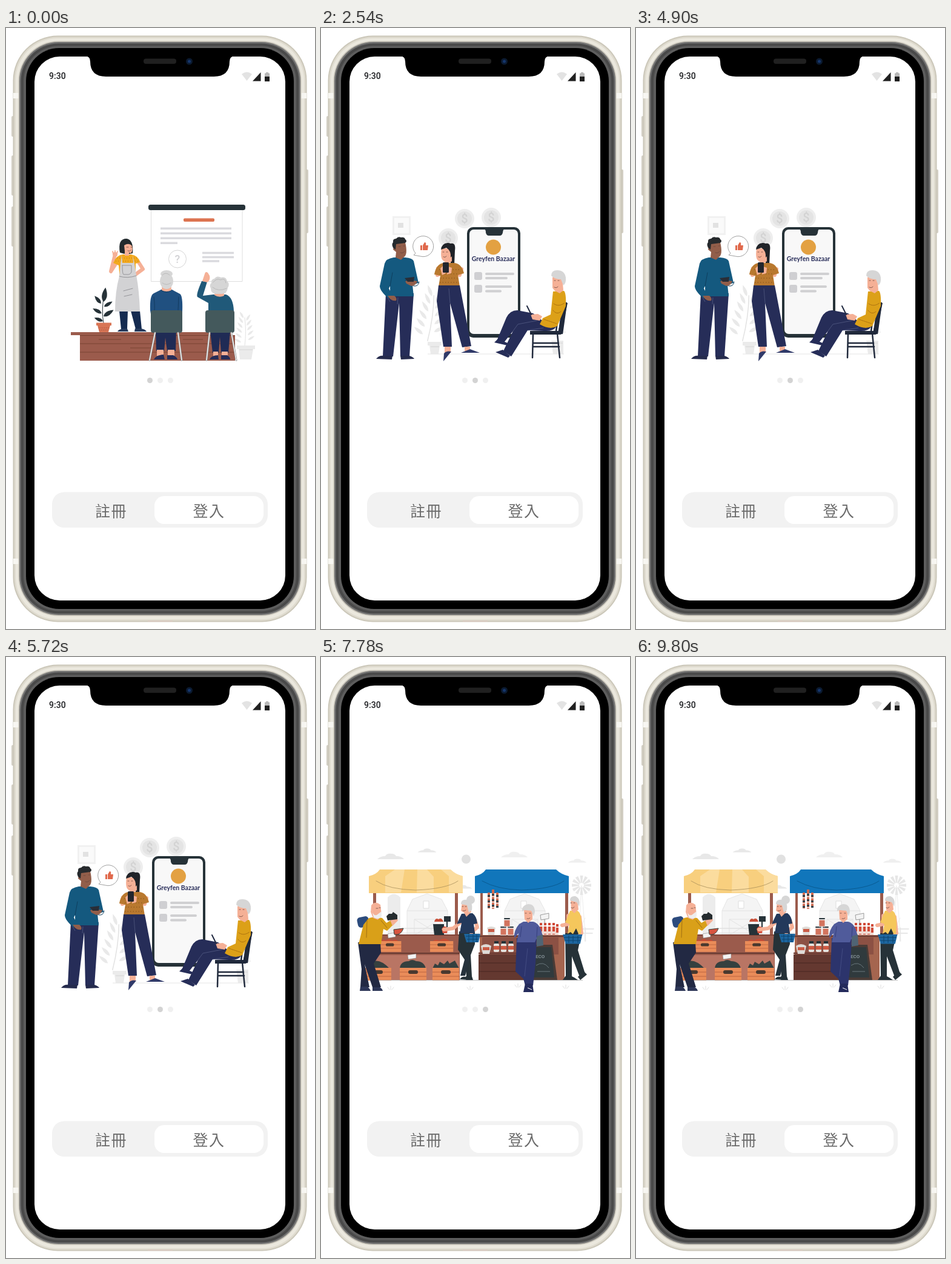
Animation, 510 px wide and 990 px high, one loop 9820 ms. Source, as an HTML page:

```html
<!DOCTYPE html>
<html lang="zh-Hant">
<head>
<meta charset="utf-8">
<title>Onboarding</title>
<style>
html, body { margin: 0; width: 100%; height: 100%; overflow: hidden; background: #fff; }
svg { display: block; width: 510px; height: 990px; }
.slide { opacity: 0; animation: 9820ms linear infinite; }
#chat { animation-name: second; }
#market { animation-name: third; }
@keyframes second {
  0%, 21.38% { opacity: 0; animation-timing-function: ease-out; }
  24.44%, 100% { opacity: 1; }
}
@keyframes third {
  0%, 72.3% { opacity: 0; animation-timing-function: ease-out; }
  75.36%, 100% { opacity: 1; }
}
.line { fill: none; stroke-linecap: round; stroke-linejoin: round; }
.skin { fill: #f5b096; } .dark { fill: #263238; } .navy { fill: #262d58; }
.pale { fill: #ebebeb; } .grey { fill: #dcdce0; } .hair { fill: #d6d6d6; }
.wood { fill: #9b5b4c; } .crate { fill: #ea8c59; } .face { stroke: #68443c; stroke-width: .8; }
.arm { stroke: #f5b096; stroke-width: 6; }
.menu { font: 25px "Noto Sans CJK TC", "Noto Sans CJK", sans-serif; letter-spacing: 1.5px; fill: #6b6b6b; }
</style>
</head>
<body>
<svg viewBox="0 0 510 990">
<defs>
  <path id="leaf" d="M0 0Q-5-5 0-14Q5-5 0 0"/>
  <g id="sprig">
    <path class="line" d="M0 50Q3 25 0 3" stroke="#e2e2e2"/>
    <g id="leaves"></g>
  </g>
  <g id="coin"><circle r="16" fill="#eee"/><circle r="12" fill="#e4e4e4"/><text y="7" text-anchor="middle" font-family="Roboto, sans-serif" font-size="20" font-weight="500" fill="#d3d3d3">$</text></g>
  <path id="cloud" d="M-22 4Q-17-1-9-1Q-6-6 1-5Q7-5 9-1Q18-1 22 4Z" fill="#e8e8e8"/>
  <path id="awning" d="M18 0H134Q142 8 155 11V39H0V11Q13 8 18 0Z"/>
  <g id="box"><path class="crate" d="M0 0H44V21H0Z"/><path d="M0 7H44M0 14H44" stroke="#b65f3d" stroke-width=".9"/><rect x="14" y="4" width="16" height="6" rx="3" fill="#49392f"/></g>
  <g id="barn"><path d="M0 68V28L9 9L33 0L57 9L67 28V68Z" fill="#f4f4f4" stroke="#e5e5e5"/><path d="M0 28H67M12 68V42H55V68M12 42L55 68M55 42L12 68" fill="none" stroke="#e3e3e3"/><path d="M27 12H36V24H27Z" fill="#fff" stroke="#ddd"/></g>
  <g id="jar"><rect width="9" height="14" y="4" rx="2" fill="#e4e1dc"/><rect x="1" width="7" height="4" fill="#263238"/><rect y="8" width="9" height="6" fill="#cf5a43"/></g>
  <path id="basket" d="M0 0H27L24 14H4Z"/>
  <path id="tuft" class="line" d="M0 0L-3-4M2 0V-6M4 0L7-4" stroke="#d6d6d6" stroke-width=".8"/>
</defs>

<!-- handset -->
<g fill="#d3cfc4">
  <rect x="9" y="145" width="5" height="34" rx="2"/><rect x="9" y="210" width="5" height="66" rx="2"/>
  <rect x="9" y="294" width="5" height="66" rx="2"/><rect x="494" y="233" width="5" height="105" rx="2"/>
</g>
<rect x="11.500" y="12.500" width="485" height="966" rx="74" fill="#cbc7b9"/>
<rect x="13.500" y="14.500" width="481" height="962" rx="72" fill="#dfdbcf"/>
<rect x="16" y="17" width="476" height="957" rx="69.500" fill="#ebe8de"/>
<path d="M12 107H22V116H12ZM486 107H496V116H486ZM12 874H22V883H12ZM486 874H496V883H486Z" fill="#f7f6f1"/>
<path d="M234 977H275" stroke="#d8c8bf" stroke-width="2"/>
<rect x="20.500" y="21.500" width="467" height="947" rx="66" fill="#c5c1b6"/>
<rect x="22" y="23" width="464" height="944" rx="64.500" fill="#727272"/>
<rect x="24.500" y="25.500" width="459" height="939" rx="62" fill="#494949"/>
<rect x="29" y="29.500" width="450" height="931" rx="58" fill="#5d5d5d"/>
<rect x="33" y="33" width="442" height="924" rx="54.500" fill="#000"/>
<rect x="47" y="47" width="414" height="896" rx="41.500" fill="#fff"/>
<path d="M131 46Q139 47 139 55Q139 80 165 80H343Q369 80 369 55Q369 47 377 46Z"/>
<rect x="227" y="50.500" width="54" height="8.500" rx="4" fill="#202020"/>
<circle cx="302.500" cy="55" r="5.500" fill="#0b1a30"/><circle cx="302.500" cy="55" r="2.500" fill="#15366c"/>
<text x="71" y="84" font-family="Roboto, sans-serif" font-size="14" font-weight="500" fill="#202124">9:30</text>
<path d="M389 76Q397.500 69 406 76L397.500 87Z" fill="#e3e3e3"/>
<path d="M407 87.500L420.500 73V87.500Z" fill="#202020"/>
<path d="M427 74.500H429V73H433V74.500H435V81H427Z" fill="#b9b9b9"/><path d="M427 80H435V88H427Z" fill="#202020"/>

<rect x="76" y="764.500" width="356" height="58.500" rx="20" fill="#f2f2f2"/>
<rect x="245" y="771" width="180" height="46" rx="16" fill="#fff"/>
<text class="menu" x="147" y="805">註冊</text><text class="menu" x="308.500" y="805">登入</text>

<!-- class -->
<g id="class">
  <g fill="#f0f0f0"><circle cx="254.500" cy="580.500" r="4.500"/><circle cx="271.500" cy="580.500" r="4.500"/></g><circle cx="237.500" cy="580.500" r="4.500" fill="#d3d3d3"/>
  <path d="M239.500 300V417.500H390V300" fill="#fff" stroke="#dedede"/>
  <rect class="dark" x="235" y="291" width="160" height="9" rx="3.500"/>
  <rect x="293" y="313.500" width="51" height="5.500" rx="2" fill="#dc7350"/>
  <path d="M255 330.300H372M255 338.300H372M255 346.300H372M255 354.300H283M324 370.500H376M324 377.500H376M324 384H352" stroke="#dadade" stroke-width="3.400"/>
  <circle cx="283" cy="380.500" r="14.500" fill="#fff" stroke="#d5d5d5"/>
  <text x="283" y="387" text-anchor="middle" font-family="Roboto, sans-serif" font-size="18" font-weight="500" fill="#d3d3d6">?</text>
  <use href="#sprig" x="394" y="474"/>
  <path class="pale" d="M381 523H411V529H408L405 546H386L384 529H381Z"/><path d="M385 530H407" stroke="#d5d5d5"/>
  <path class="wood" d="M107 501H372V506H378V548H122V506H107Z"/>
  <path d="M122 506.500H378M122 520H378M122 534H378M153 513H190M205 527H239M292 513H325" stroke="#74412f" stroke-width=".9"/>
  <g class="dark">
    <path class="line" d="M161 486Q157 466 162 438" stroke="#263238"/>
    <use href="#leaf" transform="translate(161 451)rotate(8)scale(1.700)"/>
    <use href="#leaf" transform="translate(157 454)rotate(-40)scale(1.200)"/>
    <use href="#leaf" transform="translate(162 459)rotate(58)scale(1.150)"/>
    <use href="#leaf" transform="translate(158 470)rotate(-62)scale(1.200)"/>
    <use href="#leaf" transform="translate(161 475)rotate(58)scale(1.400)"/>
    <use href="#leaf" transform="translate(160 483)rotate(-68)scale(1.100)"/>
  </g>
  <path d="M149 485.500H174V490H172L169 501H154L151 490H149Z" fill="#d87555"/><path d="M153 494H170M154 497.500H169" stroke="#a54d38" stroke-dasharray="1.500 1.500"/>

  <path d="M187 466H201L200 496H190ZM206 466H221L224 496H214Z" fill="#152b50"/>
  <path d="M184 500Q186 495 200 495L202 500ZM213 495H222Q230 496 232 500H212Z" fill="#24395b"/>
  <path class="line arm" d="M184 384L173 401L179 377M217 383L226 397L211 408"/>
  <circle class="skin" cx="180" cy="373" r="4"/><path class="line" d="M177 372L176 368M180 371V367M183 372L184 368" stroke="#f5b096" stroke-width="1.800"/>
  <path d="M193 373Q182 374 177 387L186 391L188 414H214L214 388L221 386Q219 375 206 373Z" fill="#f2a91e"/>
  <path d="M183 379H219M181 384H220" stroke="#b67312" stroke-dasharray="1 3"/>
  <path d="M191 374L192 387H210L209 374L212 388L215 407Q220 433 221 467H180Q180 434 187 409L189 388Z" fill="#d2d2d4"/>
  <path class="line" d="M187 409Q201 413 215 408M192 391H207V402Q205 407 199 406H194Q192 405 192 391M194 433L209 429M195 442L208 439" stroke="#858589" stroke-width=".8"/>
  <path d="M188 370Q184 347 199 347Q211 349 209 371Q199 374 188 370Z" fill="#222a2d"/>
  <path class="skin" d="M195 358Q203 353 208 359Q210 367 206 371L203 370V375H196V367Z"/><path class="line face" d="M199 361H202M206 361H208M201 367Q204 369 206 366"/>

  <path d="M247 497H281L280 532H266L263 510L261 532H248Z" fill="#1f2b55"/>
  <path class="skin" d="M249 530H260V540H249ZM267 530H278V540H267Z"/>
  <path class="navy" d="M244 546Q247 539 260 538L262 546ZM266 539H276Q282 542 283 546H266Z"/>
  <path d="M238 465Q237 440 244 437L258 430H272L287 438Q292 441 291 467V477H240Z" fill="#205080"/>
  <path class="line" d="M244 443Q246 458 245 466M285 443L284 466M256 432Q265 438 273 432" stroke="#123b60"/>
  <path d="M258 416H272L273 432Q265 436 257 432Z" class="skin"/><ellipse class="hair" cx="265" cy="417" rx="11" ry="13"/><ellipse class="hair" cx="265" cy="405" rx="10" ry="6"/><path class="line" d="M258 407Q264 401 270 407M258 420Q265 425 272 420" stroke="#bababa"/>
  <rect x="239" y="465" width="52" height="37" rx="4" fill="#44595c"/>
  <path class="line" d="M246 502L237 547M284 502L290 547" stroke="#858585" stroke-width="3"/><path class="line" d="M246 502L237 547M284 502L290 547" stroke="#eee" stroke-width="1.700"/>

  <path d="M337 500H370L367 535H355L353 509L351 535H341Z" fill="#1f2b55"/><path class="skin" d="M342 533H350V541H342ZM356 533H366V541H356Z"/>
  <path class="navy" d="M336 546Q339 539 350 539L351 546ZM355 539H365Q370 542 370 546H355Z"/>
  <path d="M332 418L325 441L342 439H363Q375 443 376 466V475H334V453L316 443Q313 440 323 417Z" fill="#205979"/>
  <path class="skin" d="M324 417L328 405Q329 400 333 403L336 408Q338 415 332 419ZM345 431H360V441Q352 445 344 440Z"/>
  <path class="hair" d="M338 429Q335 423 339 420Q338 414 344 413Q348 407 355 411Q363 409 365 417Q370 422 366 428Q365 438 356 438H346Q338 437 338 429Z"/><path class="line" d="M342 419Q348 411 354 415Q362 411 363 420M341 427Q350 435 364 429" stroke="#bababa"/>
  <rect x="329" y="465" width="48" height="37" rx="4" fill="#44595c"/>
  <path class="line" d="M336 502L331 547M372 502L380 547" stroke="#858585" stroke-width="3"/><path class="line" d="M336 502L331 547M372 502L380 547" stroke="#eee" stroke-width="1.700"/>
</g>

<!-- chat -->
<g id="chat" class="slide">
  <rect x="50" y="280" width="408" height="310" fill="#fff"/>
  <g fill="#f0f0f0"><circle cx="237.500" cy="580.500" r="4.500"/><circle cx="271.500" cy="580.500" r="4.500"/></g><circle cx="254.500" cy="580.500" r="4.500" fill="#d3d3d3"/>
  <path d="M118 310H148V341H118Z" fill="#f1f1f1"/><path d="M121 313H145V338H121Z" fill="#fafafa"/><path d="M127 321H136V329H127Z" fill="#e2e2e2"/>
  <use href="#coin" x="237" y="314"/><use href="#coin" x="281" y="312"/><use href="#coin" x="210" y="346"/>
  <use href="#sprig" transform="translate(187 436)rotate(8)scale(1.500 1.600)"/>
  <path class="pale" d="M176 517H199V523H196L194 537H181L179 523H176ZM380 515H400V537H383Z"/>
  <path d="M176 537H401M386 501H404" stroke="#e5e5e5"/><path d="M181 525H195M382 519H399" stroke="#d5d5d5"/>

  <rect class="dark" x="241" y="328" width="88" height="182" rx="10"/><rect x="245" y="332" width="80" height="172" rx="7" fill="#f8f8f8"/>
  <path class="dark" d="M270 331H302Q300 334 300 337Q299 342 295 342H277Q273 342 272 337Q272 333 270 331Z"/>
  <circle cx="284.500" cy="361" r="12.500" fill="#e3a142"/>
  <text x="284.500" y="384" text-anchor="middle" font-family="Lato, sans-serif" font-size="10.500" font-weight="700" fill="#2a2f5b">Greyfen Bazaar</text>
  <rect x="253" y="402" width="13" height="13" rx="3" fill="#cfcfd2"/><rect x="253" y="423" width="13" height="13" rx="3" fill="#cfcfd2"/>
  <path class="line" d="M273 405H317M273 412H306M273 426H313M273 433.500H296" stroke="#d0d0d2" stroke-width="4"/>

  <path class="navy" d="M107 437H153L146 541H131L129 453L119 541H102Z"/><path d="M127 444L126 455M110 444L114 451" stroke="#4a527b"/>
  <path d="M91 545Q96 539 103 540H118L117 546ZM131 540H146Q152 542 154 545L132 546Z" fill="#252b4d"/>
  <path d="M120 378Q107 380 105 388L97 425Q97 433 111 445L119 443L112 429L114 425V442H153L151 423L161 420L153 384Q151 379 139 378Z" fill="#14597f"/>
  <path class="line" d="M114 425L118 403M139 416L153 425Q161 426 162 418" stroke="#0e3e5d"/>
  <path d="M121 353H139Q144 374 136 378L132 382L123 378L124 369L119 365Z" fill="#925e4a"/><path d="M119 362Q116 356 119 353Q118 347 124 347Q127 343 132 345Q138 344 139 348Q143 351 139 354L124 356L123 365Z" fill="#262a2d"/><path class="line face" d="M128 360H131M136 359H138M131 370Q135 372 138 368"/>
  <path d="M139 417L147 415L159 417Q157 424 149 425L141 421Z" fill="#925e4a"/><path d="M138 412L154 410L153 418L143 418Z" fill="#292d36"/><path d="M110 441L121 441Q126 445 124 449Q116 451 110 441" fill="#925e4a"/>

  <path d="M156 371A17 17 0 1 1 164 376L153 374Z" fill="#fff" stroke="#777" stroke-width=".7"/>
  <path d="M164 358H167V366H164ZM168 358L171 353Q174 353 173 358H177L176 366H168Z" fill="#e0694c"/>

  <path d="M214 355Q223 353 221 367L220 390L214 387Z" fill="#202328"/>
  <path class="line arm" d="M193 396L192 407L201 403M232 397L229 407L213 401" stroke-width="8"/>
  <path d="M203 387Q190 388 187 406L197 408L194 426H229L226 407L236 404Q232 388 220 387Z" fill="#b9792f"/><path d="M195 398H229M196 405H225M197 412H225M196 419H226" stroke="#81501b" stroke-dasharray="1.500 3"/>
  <path class="skin" d="M199 363H216V384L208 390L203 384Q196 381 199 363"/><path d="M198 365Q199 355 209 354Q221 354 219 373L214 378Q215 367 207 362Z" fill="#202328"/><path class="line face" d="M201 369H203M207 369H209M202 377Q205 379 207 376"/>
  <path class="skin" d="M197 396L203 390L206 404L200 407ZM210 393L216 395L215 404L208 406Z"/><rect x="201" y="386" width="10" height="17" rx="1.500" fill="#22262e"/>
  <path class="navy" d="M194 424H229L248 524L233 526L213 453L216 525H202L191 450Z"/><path d="M211 429L213 453" stroke="#485077"/><path class="skin" d="M204 525H214V535H204ZM237 525H246V532H237Z"/><path d="M202 549L203 536Q207 531 215 533ZM231 535L246 529L262 535Z" fill="#303a69"/>

  <path class="line" d="M405 453L398 503H347M350 503L349 543M390 503L394 543M350 519H392M350 525H393M393 458L388 500M399 456L393 501" stroke="#20293b" stroke-width="2.500"/><path d="M345 499H396V505H345ZM391 454L407 453L403 471L398 502H391L399 465Z" fill="#20293b"/>
  <path class="navy" d="M388 492Q384 500 368 499L341 498L314 541L301 532L317 499L302 518L291 513L306 477Q312 465 324 465L350 470L364 481Z"/>
  <path class="line" d="M317 499L325 488L356 482M341 498L367 494" stroke="#4a527b"/><path class="navy" d="M286 518L292 512L308 519V523ZM288 534L300 530L312 540L309 543Z"/>
  <path d="M383 434L401 433Q405 437 404 458L390 491Q378 498 361 488L366 478L379 472Z" fill="#dca018"/><path class="line" d="M384 454Q392 460 402 453M368 480L389 487M383 465Q389 473 396 467" stroke="#ad730f" stroke-dasharray="3 1"/>
  <path class="skin" d="M382 411Q389 402 398 410L400 432L394 437L386 433L382 428ZM346 472L358 471L365 475L361 482L349 480Z"/><path class="hair" d="M380 408Q380 399 390 399Q402 399 404 411Q405 420 400 424L396 414Q386 414 380 408Z"/><path class="line face" d="M385 416H387M391 416H393M385 427Q389 429 391 426"/>
  <path class="line" d="M340 458L347 472" stroke="#222b42" stroke-width="2"/>
</g>

<!-- market -->
<g id="market" class="slide">
  <rect x="50" y="280" width="408" height="310" fill="#fff"/>
  <g fill="#f0f0f0"><circle cx="237.500" cy="580.500" r="4.500"/><circle cx="254.500" cy="580.500" r="4.500"/></g><circle cx="271.500" cy="580.500" r="4.500" fill="#d3d3d3"/>
  <use href="#cloud" x="115" y="329"/><use href="#cloud" transform="translate(175 319)scale(.7)"/><use href="#cloud" x="319" y="326" opacity=".65"/><use href="#cloud" transform="translate(423 336)scale(.7)" opacity=".7"/><use href="#cloud" transform="translate(235 379)scale(.65)"/>
  <circle cx="239.500" cy="333" r="7.500" fill="#e1e1e1"/>
  <path d="M110 459V396Q120 385 131 396V459Z" fill="#ececec"/><use href="#barn" x="142" y="390"/><use href="#barn" x="303" y="390"/>
  <path class="line" d="M228 447H262M228 455H262M410 448H450M420 455H448M436 446V468M133 447H224M133 455H224" stroke="#e1e1e1" stroke-width="1.500"/>
  <path class="line" d="M430 377L425 468M430 377L437 468M426 450L436 430M435 450L427 430" stroke="#ededed"/>
  <g id="mill" transform="translate(430 376)" fill="#e6e6e6"></g>

  <path class="wood" d="M86 388H91V532H86ZM221 388H226V532H221ZM263 388H267V532H263ZM403 388H408V463H403Z"/>
  <path class="wood" d="M87 458H229V532H87Z"/><path d="M89 491H228V532H89Z" fill="#b97564"/><path d="M88 488H229" stroke="#683b32" stroke-width="2"/><path d="M88 458H229" stroke="#804438" stroke-width="2"/>
  <use href="#awning" x="79" y="350" fill="#f8cf7e"/>
  <path d="M122 350H138L132 388H106V361ZM159 350H175L186 362V388H158ZM198 350H214Q222 358 234 361V388H211V361Z" fill="#fbdc9e"/><path class="line" d="M91 369Q112 383 156 384Q207 382 226 369" stroke="#9f8755" stroke-width=".7"/>
  <path d="M99 469Q102 463 107 467Q112 462 117 467Q124 463 128 469ZM184 469Q189 463 195 467Q204 460 214 469Z" fill="#c54e36"/><use href="#box" transform="translate(95 468)scale(.85)"/><use href="#box" transform="translate(180 468)scale(.87 .85)"/>
  <path d="M84 513V502Q97 496 113 513ZM130 513Q131 501 145 501Q150 497 157 501Q170 501 173 513ZM184 513L188 505L193 508L196 502L203 506L209 500L212 505L221 500L228 513Z" fill="#35403f"/><use href="#box" transform="translate(72 512)"/><use href="#box" x="130" y="512"/><use href="#box" x="184" y="512"/>
  <path d="M143 491L157 489V496L144 498ZM110 456L123 454V461L111 463Z" fill="#f4f4f4" stroke="#777" stroke-width=".5"/>
  <path d="M120 449L136 447Q132 459 121 457Z" fill="#d75440" stroke="#34413b"/><path class="dark" d="M185 440H203V458H187ZM203 427H214V436H203ZM207 436H209V445H207Z"/><path d="M187 436Q189 429 194 432Q199 428 202 436Z" fill="#c94f38"/>
  <path d="M199 448Q204 440 209 447L208 455H201Z" fill="#d75440"/>

  <path d="M262 458H402V532H262Z" fill="#a5654f"/><path d="M266 462H392V490H266Z" fill="#8c5144"/><path d="M262 460H402M260 488H349" stroke="#6c3c34" stroke-width="2.500"/><path d="M260 490H352V532H260Z" fill="#643830"/><path d="M261 504H351M261 518H351" stroke="#472520"/>
  <use href="#awning" x="254" y="350" fill="#1176bb"/><path class="line" d="M266 369Q291 383 331 384Q382 382 401 369" stroke="#075080" stroke-width=".7"/>
  <path d="M277 388V415M284 383V415M291 388V413" stroke="#cf6a50" stroke-width="4"/><path d="M277 392V415M284 390V415M291 392V413" stroke="#39454b" stroke-width="4" stroke-dasharray="3 6"/><path d="M277 396V415M284 394V415M291 396V413" stroke="#f3e5df" stroke-width="4" stroke-dasharray="1.500 7.500"/>
  <path d="M274 446Q281 442 288 446L286 458H276Z" fill="#dedbd7"/><path d="M276 448H286V453H276Z" fill="#ca5c46"/>
  <path class="line" d="M303 431H311M297 445H305M309 445H317" stroke="#263238" stroke-width="2"/><path d="M302 433H312V444H302ZM296 447H306V458H296ZM308 447H318V458H308Z" fill="#d3745e" stroke="#eee"/>
  <use href="#jar" x="285" y="468"/><use href="#jar" x="297" y="468"/><use href="#jar" x="309" y="468"/><path d="M264 476Q272 470 281 476L278 489H267Z" fill="#dedbd7"/><path d="M267 478H278V483H267Z" fill="#ca5c46"/>
  <path d="M359 444H392V458H359Z" fill="#f0d9d2"/><path d="M363 438V457M370 438V457M377 438V457M384 438V457M390 440V457" stroke="#d04a38" stroke-width="4" stroke-dasharray="4 2 8"/>
  <path d="M362 425L376 422V431L363 433ZM369 432V440" fill="#f3f3f3" stroke="#777" stroke-width=".7"/>
  <path d="M351 474L382 474L390 532H345Z" fill="#4a3b36"/><path d="M354 478H380L385 528H350Z" fill="#303a3d"/><text x="354" y="496" font-family="Roboto, sans-serif" font-size="8" font-weight="700" fill="#839096">ECO</text><path d="M355 508Q367 500 376 512M357 518H378" fill="none" stroke="#69777d"/>
  <path d="M91 532.500H432" stroke="#a6a6a6" stroke-width=".7"/><use href="#tuft" x="113" y="548"/><use href="#tuft" x="244" y="548"/><use href="#tuft" x="323" y="544"/><use href="#tuft" x="402" y="546"/>

  <path d="M61 470H98L99 487L87 505L99 544H85L72 506L80 544H65L67 514Z" fill="#222943"/><path d="M64 550L65 543H76Q80 545 82 550ZM85 544H97Q101 546 102 550H85Z" fill="#2d3657"/>
  <rect x="60" y="428" width="19" height="17" rx="5" fill="#2c4b7d" transform="rotate(-12 69 436)"/><path d="M79 430Q88 427 101 430L108 438L115 434L119 441L109 451L103 448L99 473H62L70 441Z" fill="#d9a019"/><path class="line" d="M99 434L109 446M76 433L75 462" stroke="#a16f12"/>
  <path class="skin" d="M83 409Q89 401 98 408L100 424L94 433L86 430L82 420ZM114 433L124 427L127 434L118 443Z"/><path d="M83 414Q85 427 92 425L100 419V427Q96 434 87 429Z" fill="#eee"/><path class="line face" d="M91 414H94M96 413H98"/><path d="M108 427L112 423H117L119 420L126 425V432L110 434Z" fill="#252c2f"/>

  <path class="dark" d="M228 452H254V473L247 491L249 526H240L238 500L226 482Z"/><path d="M239 491L230 525H238L247 491Z" fill="#26323c"/><path class="dark" d="M229 531Q234 524 241 528L245 532ZM239 526H249L251 532H239Z"/>
  <path class="line arm" d="M233 435L218 447L203 449M254 433L258 445L248 454" stroke-width="5"/><path d="M232 423L250 422Q257 427 258 439L252 440L254 455H229L232 438L224 440Z" fill="#23395b"/>
  <path class="skin" d="M233 404H244L248 420L240 428L236 421L231 418Z"/><path class="hair" d="M231 407Q231 398 242 400Q251 403 249 417L244 421L241 409Z"/><circle class="hair" cx="247" cy="400" r="7"/><path class="line face" d="M233 411H235M238 411H240M234 418Q237 419 239 417"/><use href="#basket" x="236" y="456" fill="#1d66a0"/><path d="M239 460H261M241 465H259M244 457V470M251 457V470M257 457V470" stroke="#0c426c"/>

  <path d="M323 463H356L354 505L350 541H337L334 530L321 518Z" fill="#2c346c"/><path d="M341 480L336 526" stroke="#4a5288" stroke-width=".8"/><path d="M337 538H349L351 552H334Z" fill="#242b5c"/><path d="M341 545L348 548" stroke="#fff"/>
  <path d="M334 436H350Q363 439 366 462L355 465L353 470H323L326 455L319 463Q318 450 327 440Z" fill="#505b9b"/><path d="M356 460L366 457L367 475L356 477Z" fill="#4f6474"/><path class="line" d="M331 444L329 461M357 445L356 461" stroke="#353f7d"/>
  <path class="skin" d="M335 416H349V432L342 438L336 432Z"/><path class="hair" d="M332 419Q331 409 342 407Q353 407 353 420L351 427L347 418L336 417Z"/><path class="line face" d="M337 422H339M344 422H346M340 431Q343 432 345 430"/>

  <path class="dark" d="M403 455H430L424 483L436 522L427 527L414 493L414 526H404Z"/><path class="dark" d="M399 532L404 525H412Q419 528 424 532ZM424 527L433 517L439 523L428 532Z"/>
  <path class="line arm" d="M408 426L408 440L398 442M427 428L430 455L425 460" stroke-width="5"/><path d="M411 418H423Q430 421 430 441L429 456H407L410 440L403 437Z" fill="#f5c75c"/>
  <path class="skin" d="M412 399H423L425 416L418 422L413 417Z"/><path class="hair" d="M411 401Q411 393 420 394Q429 398 426 411L422 404Z"/><path class="line face" d="M412 405H414M417 405H419M413 413Q416 415 418 412"/><path class="dark" d="M415 458L421 447L425 456ZM405 457L412 453L417 458Z"/><use href="#basket" transform="translate(399 457)scale(1.200 1.100)" fill="#1d66a0"/><path d="M401 462H430M403 467H428M409 459V471M416 459V471M424 459V471" stroke="#0c426c"/>
</g>
</svg>
<script>
const byId = id => document.getElementById(id);
const repeat = (n, draw) => Array.from({ length: n }, (_, i) => draw(i)).join("");

byId("leaves").innerHTML = repeat(11, i => {
  const side = i % 2 ? 1 : -1;
  return `<use href="#leaf" fill="#e9e9e9" transform="translate(${side * (2 + i * .4)} ${4 + i * 4})rotate(${side * (30 + i * 3)})scale(.75 .9)"/>`;
});
byId("mill").innerHTML = repeat(12, i =>
  `<path d="M-1-4L-2.5-16H2.500L1-4Z" transform="rotate(${i * 30})"/>`);
</script>
</body>
</html>
```
